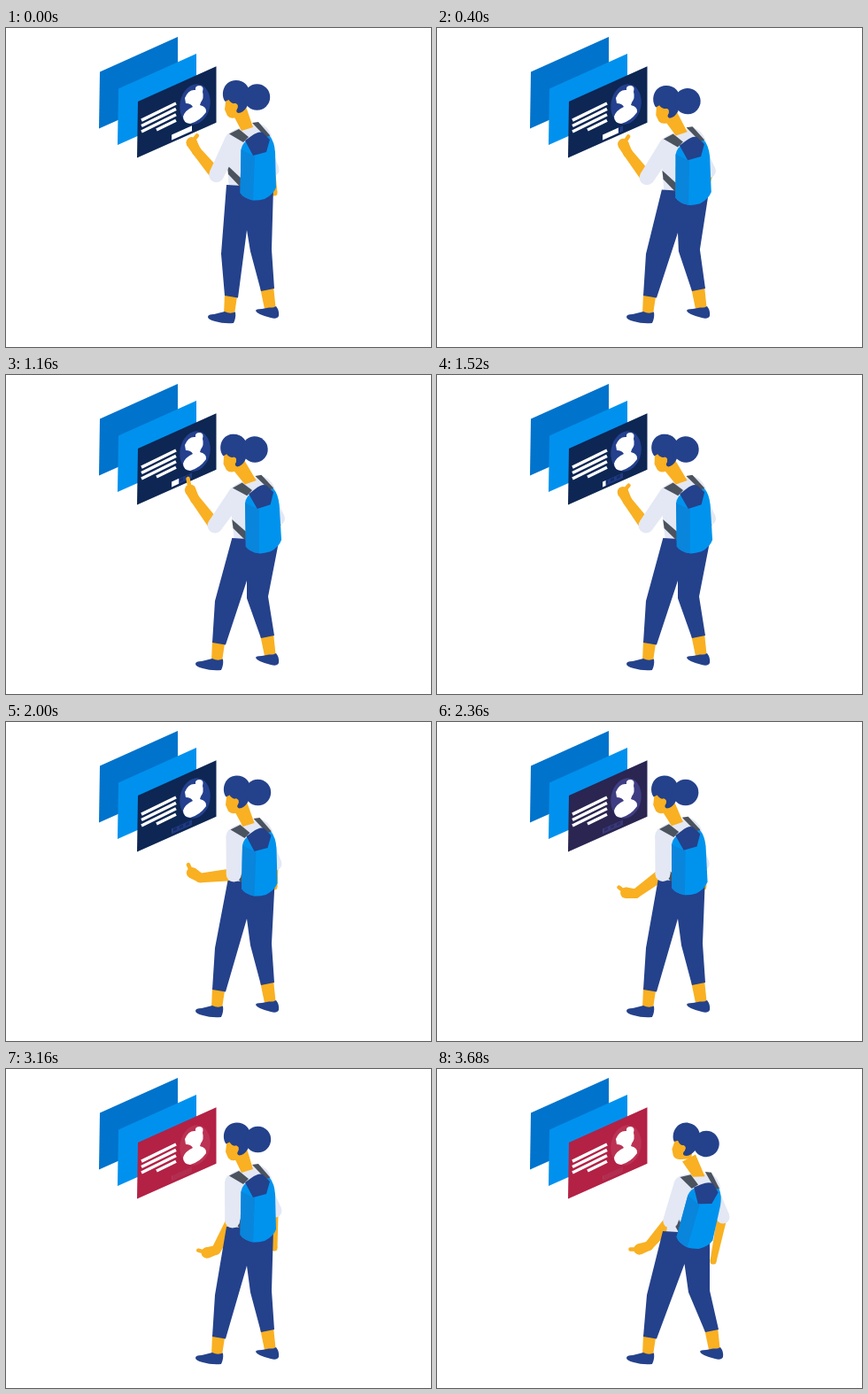
An HTML page with a canvas for the animation above (3.72 s loop, 480x360 px).

```html
<!DOCTYPE html>
<html lang="en">
<head>
<meta charset="utf-8">
<title>Profile cards</title>
<style>
  html, body { margin: 0; width: 100%; height: 100%; overflow: hidden; background: #fff; }
  canvas { display: block; width: 480px; height: 360px; }
</style>
</head>
<body>
<canvas id="stage"></canvas>
<script>
const LOOP = 3720;
const canvas = document.getElementById('stage');
const ctx = canvas.getContext('2d');
const dpr = window.devicePixelRatio || 1;
canvas.width = 480 * dpr;
canvas.height = 360 * dpr;

const NAVY = '#24418b', SKIN = '#f9b022', SHIRT = '#e4e8f4', STRAP = '#4b535f';

function ramp(t, from, to) {
  const k = Math.min(1, Math.max(0, (t - from) / (to - from)));
  return k * k * (3 - 2 * k);
}

// The phases of the gesture, each from 0 to 1.
function phases(t) {
  const lower = ramp(t, 1520, 2000), drop = ramp(t, 2000, 2680);
  return {
    lower, drop,
    step: ramp(t, 0, 400),
    bend: ramp(t, 0, 580) - lower,
    sway: ramp(t, 320, 580) - ramp(t, 580, 840),
    press: ramp(t, 300, 840) - ramp(t, 1000, 1520),
    back: ramp(t, 2680, 3160),
    recoil: drop - ramp(t, 2680, 3160),
    turn: ramp(t, 3160, 3320),
    red: ramp(t, 2200, 2800),
    code: Math.max(0, 1 - t / 1800)
  };
}

const mix = (a, b, k) => `rgb(${a.map((v, i) => Math.round(v + (b[i] - v) * k))})`;

function shape(d, fill) {
  ctx.fillStyle = fill;
  ctx.fill(new Path2D(d));
}

const poly = (points, fill) => shape('M' + points.map(p => p.join(' ')).join('L') + 'Z', fill);

function line(a, b, width, color, cap = 'butt') {
  ctx.lineWidth = width;
  ctx.strokeStyle = color;
  ctx.lineCap = cap;
  ctx.beginPath();
  ctx.moveTo(...a);
  ctx.lineTo(...b);
  ctx.stroke();
}

function ellipse(x, y, rx, ry, fill, turn = 0) {
  ctx.fillStyle = fill;
  ctx.beginPath();
  ctx.ellipse(x, y, rx, ry, turn, 0, 2 * Math.PI);
  ctx.fill();
}

// A limb with round ends of widths wa and wb.
function limb(a, b, wa, wb, fill) {
  const len = Math.hypot(b[0] - a[0], b[1] - a[1]);
  const nx = (a[1] - b[1]) / len / 2, ny = (b[0] - a[0]) / len / 2;
  poly([[a[0] + nx * wa, a[1] + ny * wa], [b[0] + nx * wb, b[1] + ny * wb],
        [b[0] - nx * wb, b[1] - ny * wb], [a[0] - nx * wa, a[1] - ny * wa]], fill);
  ellipse(...a, wa / 2, wa / 2, fill);
  ellipse(...b, wb / 2, wb / 2, fill);
}

// Point at a distance; 0 degrees is down, 90 is left.
function reach([x, y], deg, len) {
  const a = deg * Math.PI / 180;
  return [x - Math.sin(a) * len, y + Math.cos(a) * len];
}

function local(x, y, deg, draw) {
  ctx.save();
  ctx.translate(x, y);
  ctx.rotate(deg * Math.PI / 180);
  draw();
  ctx.restore();
}

function slanted(x, y, w, h, fill) {
  const dy = w * 0.445;
  poly([[x + h / 64, y], [x + w, y - dy], [x + w, y + h - dy], [x, y + h]], fill);
}

function cards({ red, code }) {
  slanted(105, 49.5, 89, 64, '#0073cc');
  slanted(126, 68.5, 89, 63.5, '#0091ee');
  slanted(148, 83, 89.5, 63.5, mix([13, 38, 83], [179, 33, 69], red));

  for (let i = 0; i < 4; i++) {
    const x = i < 3 ? 153 : 170, y = 85 + i * 6.4;
    line([x, y + (192 - x) * 0.49], [192, y], 3.4, '#fff');
  }

  ellipse(213.5, 86, 17, 23, mix([36, 64, 142], [188, 50, 82], red), 0.2);
  shape('M202 79Q206 69 214 70Q213 65 219 65Q224 66 222 72Q224 79 220 84L219 87' +
        'Q227 89 226 95Q219 105 208 108Q200 107 200 100Q202 93 211 89Q209 85 203 85Z', '#fff');

  slanted(187, 120.5, 23, 6, mix([31, 58, 128], [177, 46, 80], red));
  for (let x = 189; x < 208; x += 7) {
    slanted(x, 121.5 - (x - 187) * 0.445, 4, 3, mix([20, 43, 102], [177, 46, 80], red));
  }
  slanted(187, 120.5, 23 * code, 6, '#fff');
}

function legs({ step, bend, lower, turn }, hx, hy) {
  const fl = 14 * (1 - step), fr = 15 * turn;
  const kl = 243 - 7 * step + turn, kr = 300 - 4 * bend + 8 * turn;
  const crotch = [272 + 7.5 * turn, 228 + 4 * bend - 6 * lower - 2 * turn];

  local(fl, 0, 0, () => {
    poly([[233, 300], [247.5, 300], [244, 323], [232, 323]], SKIN);
    shape('M214 326Q214 323 221 323L233 320Q239 323 245 320.5Q246 327 243 333Q232 334 222 331Q214 329 214 326Z', NAVY);
  });
  local(fr, 0, 0, () => {
    poly([[287, 293], [302, 291], [304.5, 315], [292, 317]], SKIN);
    shape('M282 319Q282 317 289 317L297 315.5Q302 316 305 314Q309 319 308 325Q306 329 299 327Q283 323 282 319Z', NAVY);
  });

  poly([[249 + hx, 177 + hy], [kl, 255], [233 + fl, 302], [248 + fl, 304.5], crotch,
        [kr - 24, 252], [288 + fr, 297], [303 + fr, 294], [kr, 250], [302 + hx, 180 + hy]], NAVY);
}

function head(x, y, deg) {
  local(x, y, deg, () => {
    shape('M-35 1L-36.5 14L-33.5 21Q-30 25 -24 23L-13 20L-14 0Z', SKIN);
    shape('M-36 5C-42 -4 -37 -19 -24 -19C-14 -19 -8 -12 -8 -2C-8 8 -14 18 -21 18Q-25 17 -22 12L-24 7Q-29 8 -32 3Z', NAVY);
    ellipse(0, 0, 14.7, 14.7, NAVY);
    ellipse(-25, 11, 3.2, 4, SKIN, 0.3);
  });
}

function backpack() {
  shape('M265.5 137Q267 129 274 126L298 122Q303 128 304 140L305 180Q302 188 292 193Q284 195 279 194.5Q268 192 264.5 186Z', '#0093ee');
  shape('M265.5 137L281 145L279 194.5Q268 192 264.5 186Z', '#0985dc');
  shape('M270 127L277 122Q285 116 290 118L298 126L294 140L279 144Z', NAVY);
}

function person(p) {
  const { step, bend, sway, press, lower, drop, back, recoil, turn } = p;
  const hx = 6.3 * bend + 1.5 * (lower - drop) + 6 * turn;
  const hy = 7 * bend + 2 * (lower - drop) + back + 5 * turn;
  const lean = 3 * sway - 2.1 * bend - 2.6 * recoil + 14 * turn;
  const bx = 283.5 + 6 * sway - 2.5 * bend + lower - 7 * recoil + 19.5 * turn;
  const by = 78 + 6 * bend + 1.5 * lower + 5 * turn;

  const rad = lean * Math.PI / 180, cos = Math.cos(rad), sin = Math.sin(rad);
  const onTorso = (x, y) => [275 + hx + (x - 275) * cos - (y - 185) * sin,
                             185 + hy + (x - 275) * sin + (y - 185) * cos];
  const torso = draw => local(275 + hx, 185 + hy, lean, () => { ctx.translate(-275, -185); draw(); });

  // Near arm
  const foreTurn = 140 + 3 * bend - 56 * lower - 55 * drop + 12 * turn;
  const handTurn = foreTurn + 10 + 28 * lower + 6 * drop - 14 * turn;
  const fingerTurn = handTurn + 68 * (1 - press) * (1 - lower) + 33 * lower - 15 * turn;
  const shoulder = onTorso(256.5, 127);
  const elbow = reach(shoulder, 26 + 9 * bend - 25 * lower + 17 * turn, 43);
  const wrist = reach(elbow, foreTurn, 35 + 3 * lower + 4 * press);
  const knuckle = reach(wrist, handTurn, 11);
  const tip = reach(knuckle, fingerTurn, 10 + 4 * press);

  // Far arm
  const farElbow = [301 + 6.5 * bend + 6 * sway + 3 * lower - 7 * recoil + 19 * turn, 160 + 2 * bend + 7 * turn];
  const farHand = [303 - 2 * bend - 4 * recoil + 9 * turn, 186 + 16 * back + 15 * turn];
  limb([farElbow[0] - 2, farElbow[1] + 5], farHand, 11, 7, SKIN);
  limb(onTorso(287, 119), farElbow, 13, 15, SHIRT);

  limb(elbow, wrist, 14, 10.5, SKIN);
  limb(wrist, knuckle, 10.5, 12.5, SKIN);
  line(knuckle, tip, 4.5, SKIN, 'round');

  torso(() => shape('M250 120Q260 112 270 112L284 107Q295 109 300 122L303 184L252 184L249 140Z', SHIRT));
  legs(p, hx, hy);

  poly([[bx - 27, by + 20], [bx - 12, by + 12], onTorso(279, 112), onTorso(266, 116)], SKIN);
  head(bx, by, 12 * turn - 4 * bend);

  torso(() => poly([[250, 155], [267, 171], [267, 182], [251, 165]], STRAP));
  limb(shoulder, elbow, 19, 17, SHIRT);
  torso(() => {
    poly([[252, 119.5], [263, 114], [274, 123], [268, 129]], STRAP);
    poly([[278, 107], [285, 106], [298, 121], [297, 127]], STRAP);
    backpack();
  });
}

const start = performance.now();
function tick() {
  const p = phases((performance.now() - start) % LOOP);
  ctx.setTransform(dpr, 0, 0, dpr, 0, 0);
  ctx.fillStyle = '#fff';
  ctx.fillRect(0, 0, 480, 360);
  cards(p);
  person(p);
  requestAnimationFrame(tick);
}
tick();
</script>
</body>
</html>
```
